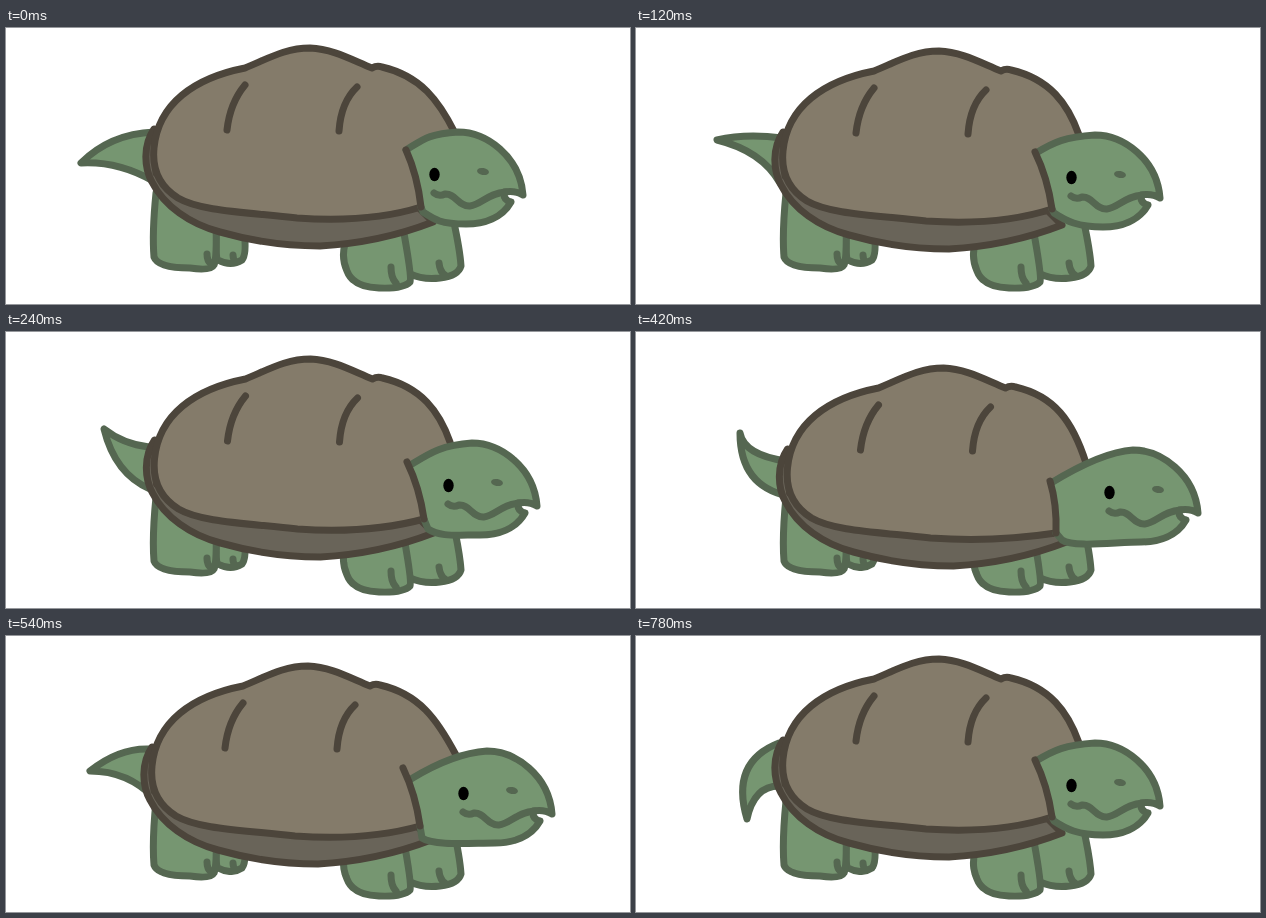
Animation, 624 px wide and 276 px high, one loop 0.84 s. Source, as an HTML page:

```html
<!DOCTYPE html>
<html lang="en">
<head>
<meta charset="utf-8">
<title>Turtle</title>
<style>
  html, body { margin: 0; width: 100%; height: 100%; overflow: hidden; background: #fff; }
  svg { display: block; width: 100%; height: 100%; }
  path { stroke-width: 7; stroke-linecap: round; stroke-linejoin: round; }
  .skin { fill: #769671; stroke: #556751; }
  .shell { fill: #847b6a; stroke: #4c453b; }
  .rim { fill: #696459; stroke: #4c453b; }
  .line { fill: none; }
</style>
</head>
<body>
<svg viewBox="0 0 624 276">
  <path id="tail" class="skin"/>
  <g class="skin">
    <path d="M210 195V211Q210 230 212 232Q225 239 236 232Q241 226 238 203M227 227Q227 232 230 234"/>
    <path d="M150 165Q146 205 148 229Q152 240 184 240Q205 243 208 237Q211 230 210 195M201 226Q201 233 205 236"/>
    <path d="M397 190Q397 235 404 246Q417 252 434 250Q452 248 455 238Q454 222 447 190M433 235Q434 244 439 247"/>
    <path d="M343 205Q333 226 341 243Q347 259 373 260Q397 261 404 254Q406 249 397 200M385 239Q385 250 390 255"/>
  </g>
  <g id="body">
    <path class="rim" d="M148 101C137 117 138 140 146 154C158 178 184 196 214 204C242 212 274 218 314 218C350 216 391 208 427 194L413 180L150 145Z"/>
    <path id="dome" class="shell"/>
    <path class="shell line" stroke-width="6" d="M239 57Q224 75 221 102M351 59Q335 74 333 103"/>
  </g>
  <path id="head" class="skin"/>
  <g id="face">
    <path class="skin line" d="M428 165Q433 169 439 166C449 165 453 179 464 178S482 165 500 164"/>
    <ellipse cx="428.5" cy="146.500" rx="5.200" ry="6.700"/>
    <ellipse cx="477" cy="143.500" rx="6" ry="3.500" fill="#556751" transform="rotate(10 477 143.500)"/>
  </g>
  <path id="collar" class="shell line"/>
</svg>
<script>
const part = id => document.getElementById(id);
const LOOP = 840;

// shell and head: shifts; end: where the dome meets the head;
// nape, throat: ends of the shell opening; neck, jaw: rear ends of the head outline
const poses = {
  high:    { shell: [0, 0],    head: [0, 0],   end: [449, 105], nape: [400, 122], throat: [415, 179], neck: [400, 122], jaw: [417, 184] },
  raised:  { shell: [-1, 3],   head: [7, 3],   end: [443, 107], nape: [399, 124], throat: [416, 181], neck: [400, 125], jaw: [418, 185] },
  middle:  { shell: [0.5, 7],  head: [14, 7],  end: [444, 110], nape: [401, 130], throat: [418, 187], neck: [406, 132], jaw: [422, 197] },
  lowered: { shell: [-2, 10],  head: [29, 11], end: [450, 119], nape: [397, 132], throat: [414, 190], neck: [405, 143], jaw: [416, 202] },
  low:     { shell: [3.5, 16], head: [45, 14], end: [450, 131], nape: [414, 149], throat: [420, 201], neck: [415, 151], jaw: [426, 208] }
};

// start time, pose, tail: upper root, bend, tip, bend, lower root
const steps = [
  [0,   "high",    "M148 104Q104 106 75 135Q112 133 147 153"],
  [60,  "high",    "M147 107Q106 104 75 123Q120 126 146 154"],
  [120, "raised",  "M146 110Q110 105 81 112Q126 123 144 155"],
  [240, "middle",  "M143 115Q117 112 98 97Q109 142 144 157"],
  [360, "lowered", "M143 121Q112 114 100 98Q104 148 147 161"],
  [420, "low",     "M150 129Q108 123 104 101Q104 154 152 164"],
  [540, "lowered", "M143 113Q113 112 84 135Q122 135 148 162"],
  [660, "middle",  "M143 111Q104 113 93 163Q119 138 146 157"],
  [780, "raised",  "M143 107Q94 126 111 183Q118 150 143 150"]
];

const set = (id, d) => part(id).setAttribute("d", d);
const move = (id, [x, y]) => part(id).setAttribute("transform", `translate(${x} ${y})`);

function drawPose({ shell, head, end, nape, throat, neck, jaw }) {
  const onShell = ([x, y]) => `${x - shell[0]} ${y - shell[1]}`;
  const h = (x, y) => `${x + head[0]} ${y + head[1]} `;
  const near = ([x, y], dx, dy) => `${x + dx} ${y + dy} `;

  move("body", shell);
  set("dome", `M${onShell(throat)}C377 191 335 193 291 190C237 184 194 183 172 170`
    + `C153 158 146 140 148 120C152 76 188 50 239 40C263 30 280 20 304 20`
    + `C327 21 346 32 366 40Q371 37 376 39C415 48 433 73 ${onShell(end)}`);

  set("head", `M${near(neck, 0, 0)}C${near(neck, 18, -11)}${h(422, 106)}${h(452, 104)}`
    + `C${h(480, 104)}${h(514, 128)}${h(517, 167)}Q${h(509, 162)}${h(498, 164)}`
    + `Q${h(497, 172)}${h(505, 174)}C${h(496, 190)}${h(478, 196)}${h(460, 196)}`
    + `C${h(435, 196)}${near(jaw, 12, 8)}${near(jaw, 0, 0)}L${near(throat, 0, 0)}`);
  move("face", head);

  const bend = [(nape[0] + throat[0]) / 2 + 4, (nape[1] + throat[1]) / 2 - 3];
  set("collar", `M${nape}Q${bend} ${throat}`);
}

let shown;
function tick() {
  const time = performance.now() % LOOP;
  const step = steps.findLast(([start]) => start <= time);
  if (step !== shown) {
    shown = step;
    drawPose(poses[step[1]]);
    set("tail", step[2]);
  }
  requestAnimationFrame(tick);
}
tick();
</script>
</body>
</html>
```
